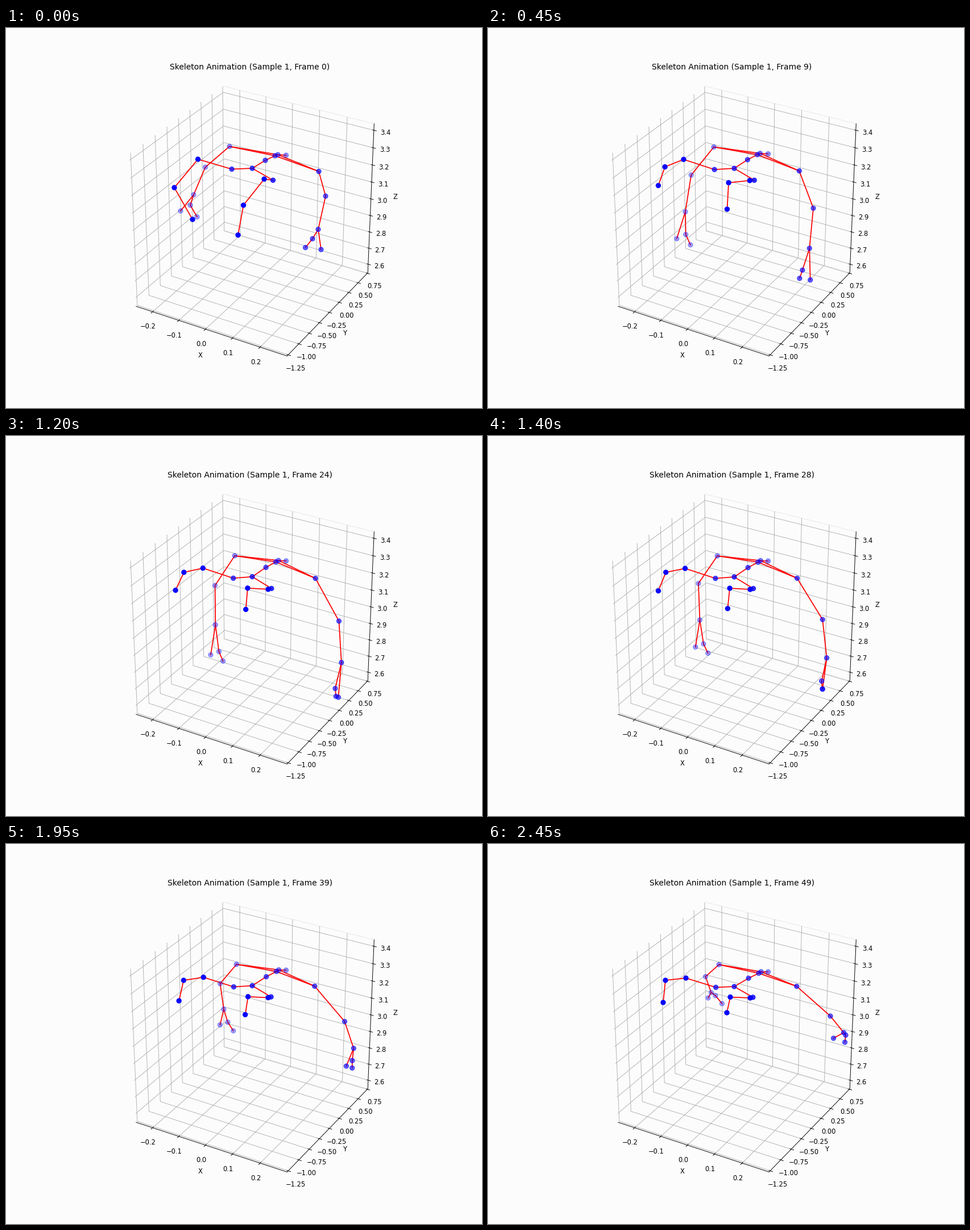
These frames come from a looping animation (837x669 px, 2.5 s). A matplotlib script:

```python
import numpy as np
import matplotlib.pyplot as plt
from matplotlib.animation import FuncAnimation
from matplotlib.collections import LineCollection

W, H = 837, 669
FRAMES, INTERVAL = 50, 50
LAST = FRAMES - 1
BG = "#fcfcfc"

step = np.arange(FRAMES)[:, None]
t = step / LAST
joints, alphas = {}, {}


def hermite(p, q, mp, mq, length, x):
    u = x / length
    return (p + (q - p) * (3*u**2 - 2*u**3)
            + length * (mp * (u**3 - 2*u**2 + u) + mq * (u**3 - u**2)))


def swing(turn, *points):
    """Move through three points, passing the second one at step `turn`."""
    a, b, c = np.array(points, float)
    d0, d1 = (b - a) / turn, (c - b) / (LAST - turn)
    # Flat where the direction reverses, harmonic mean of the speeds elsewhere.
    m = (np.sign(d0) * 2 * np.maximum(d0 * d1, 0)
         / (abs(d0) + abs(d1) + 1e-9))
    return np.where(step < turn,
                    hermite(a, b, d0, m, turn, step),
                    hermite(b, c, m, d1, LAST - turn, step - turn))


def limb(side, turn, alpha, **paths):
    for name, points in paths.items():
        joints[f"{side}_{name}"] = swing(turn, *points)
        alphas[f"{side}_{name}"] = alpha


def pair(name, centre, left, right, squeeze):
    """Left and right joints close in on a drifting centre as the body turns."""
    origin, drift = joints[centre][0], joints[centre] - joints[centre][0]
    drift = t * drift[-1]
    scale = 1 - squeeze * (1 - (1 - t)**2)
    for side, start in (("l", left), ("r", right)):
        joints[f"{side}_{name}"] = origin + drift + scale * (start - origin)


# The spine sways sideways, sinks, and lifts most at the top.
spine = {"base": (433, 247), "mid": (456, 233), "chest": (473, 225),
         "neck": (478, 223), "head": (492.5, 224)}
for k, (name, (x, y)) in enumerate(spine.items()):
    sway = 3 * np.sin(np.pi * k / 4) * t
    sink = (4 - 0.7 * k) * t - 0.15 * (255 - y) * np.sin(np.pi * t)
    joints[name] = np.hstack([x + sway, y + sink])
    alphas[name] = 0.74 - 0.08 * k

pair("shoulder", "neck", (550, 252.5), (393, 208.5), 0.13)
pair("hip", "base", (469.5, 268), (397, 248.5), 0.1)
alphas.update(l_shoulder=0.66, r_shoulder=0.42, l_hip=0.8, r_hip=0.72)

limb("l", 12, 1,
     knee=[(454, 266), (461, 269), (461, 271)],
     ankle=[(417.5, 312), (424, 267.5), (426, 269.5)],
     foot=[(408, 364.5), (422, 312), (420, 297)])
limb("r", 12, 0.96,
     knee=[(337.5, 231), (345, 231.5), (348, 236)],
     ankle=[(296, 281), (313, 240), (312, 240)],
     foot=[(328, 337), (296, 270), (308, 279)])
limb("l", 17, 0.62,
     elbow=[(562, 296), (580, 328), (602, 303)],
     wrist=[(549, 354.5), (579, 405), (625.5, 332)],
     hand=[(539, 371), (566, 454.5), (629, 336.5)],
     tip=[(526.5, 386.5), (566, 468.5), (627.5, 349)],
     thumb=[(554, 390), (577, 471), (607.5, 342)])
limb("r", 17, 0.36,
     elbow=[(350.5, 245), (363, 266), (382.5, 233.5)],
     wrist=[(330, 293.5), (360, 339), (392.5, 261.5)],
     hand=[(324, 312), (365, 390), (400, 267)],
     tip=[(336, 332.5), (371.5, 407), (411.5, 281)],
     thumb=[(307, 322), (350, 396), (387, 271)])

CHAINS = ["base mid chest neck head",
          "neck l_shoulder chest r_shoulder neck"]
for s in "lr":
    CHAINS += [f"base {s}_hip {s}_knee {s}_ankle {s}_foot",
               f"{s}_shoulder {s}_elbow {s}_wrist {s}_hand {s}_tip",
               f"{s}_wrist {s}_thumb"]
CHAINS = [c.split() for c in CHAINS]

fig = plt.figure(figsize=(10.0845, 8.0604), dpi=83, facecolor=BG)
ax = fig.add_subplot(111, projection="3d", facecolor=BG)
ax.set_box_aspect((1, 1, 1))
ax.set_xlim(-0.264, 0.296)
ax.set_ylim(-1.276, 0.763)
ax.set_zlim(2.546, 3.437)
ax.set_xticks(np.arange(-2, 3) / 10)
ax.set_yticks(np.arange(-5, 4) / 4)
ax.set_zticks(np.arange(26, 35) / 10)
ax.set_xlabel("X")
ax.set_ylabel("Y")
ax.set_zlabel("Z")
for axis in (ax.xaxis, ax.yaxis, ax.zaxis):
    axis.set_pane_color((1, 1, 1, 0))
back = ax.yaxis.pane
back.set_fill(False)
back.set_alpha(None)
back.set_edgecolor("#ebebeb")
title = ax.set_title("")

# The skeleton lives on a flat layer in stage pixels.
stage = fig.add_axes([0, 0, 1, 1])
stage.set_xlim(0, W)
stage.set_ylim(H, 0)
stage.axis("off")
bones = LineCollection([], colors="red", linewidths=1.5, capstyle="projecting",
                       zorder=2)
stage.add_collection(bones, autolim=False)

order = sorted(joints, key=alphas.get)
dots = stage.scatter(np.zeros(len(order)), np.zeros(len(order)), s=50,
                     c=[(0, 0, 1, alphas[n]) for n in order], zorder=3)


def draw(i):
    title.set_text(f"Skeleton Animation (Sample 1, Frame {i})")
    bones.set_segments([[joints[a][i], joints[b][i]]
                        for c in CHAINS for a, b in zip(c, c[1:])])
    dots.set_offsets([joints[n][i] for n in order])
    return title, bones, dots


anim = FuncAnimation(fig, draw, frames=FRAMES, interval=INTERVAL,
                     repeat=True, repeat_delay=0, blit=False)
plt.show()
```
